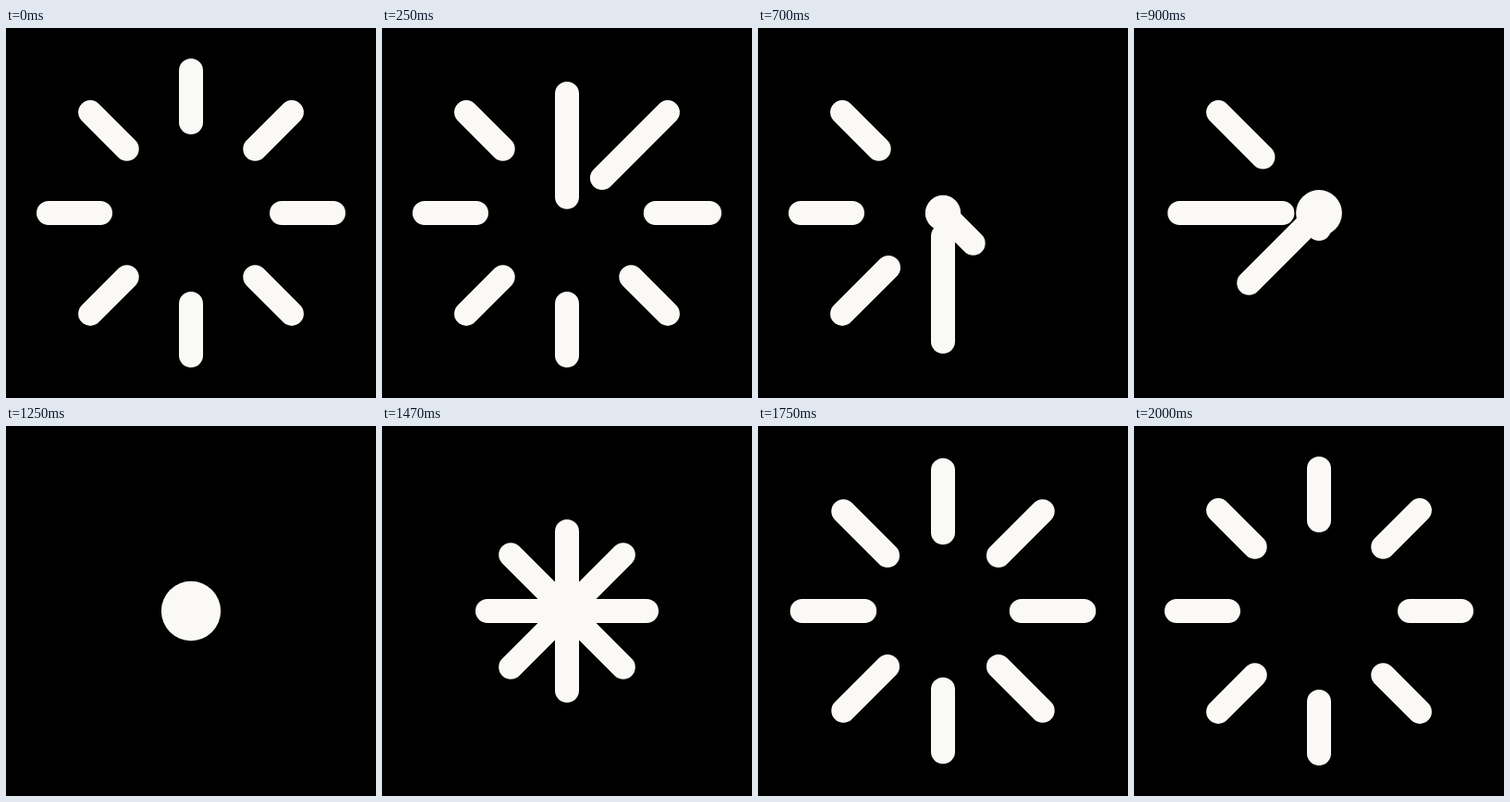
Animation of 400x400 px, one loop 2.02 s. Source, as an HTML page:

```html
<!DOCTYPE html>
<html lang="en">
<head>
<meta charset="utf-8">
<title>Spinner</title>
<style>
  html, body { margin: 0; width: 100%; height: 100%; overflow: hidden; background: #000; }
  svg { display: block; width: 100%; height: 100%; }
</style>
</head>
<body>
<svg viewBox="-200 -200 400 400">
  <g id="rays" stroke="#faf9f5" stroke-width="26" stroke-linecap="round"></g>
  <circle id="dot" fill="#faf9f5"/>
</svg>
<script>
const LOOP = 2020;
const INNER = 98, OUTER = 154;
const CAP = 13, DOT = 32.5;

// When the outer end of each ray starts inward, clockwise from the top.
const STARTS = [166, 254, 380, 489, 637, 779, 872, 986];
const LEAD = 159, PULL = 333;
const BURST = 1333, RELEASE = 1452;

const progress = (t, start, length) => Math.min(1, Math.max(0, (t - start) / length));
const smooth = p => p * p * (3 - 2 * p);
const burst = p => smooth(Math.sqrt(p));
const mix = (a, b, p) => a + (b - a) * p;

const dot = document.getElementById("dot");
const rays = STARTS.map((start, i) => {
  const line = document.createElementNS("http://www.w3.org/2000/svg", "line");
  line.setAttribute("transform", `rotate(${i * 45})`);
  document.getElementById("rays").append(line);
  return { line, start };
});

function drawRay({ line, start }, t) {
  let inner, outer;
  if (t < BURST) {
    inner = INNER * (1 - smooth(progress(t, start - LEAD, PULL)));
    outer = OUTER * (1 - smooth(progress(t, start, PULL)));
  } else {
    inner = INNER * burst(progress(t, RELEASE, 505));
    outer = OUTER * burst(progress(t, BURST, 475));
  }
  line.setAttribute("y1", -inner);
  line.setAttribute("y2", -outer);
}

function dotRadius(t) {
  if (t < 333 || t >= RELEASE) return 0;
  if (t < BURST) return mix(CAP, DOT, smooth(progress(t, 320, BURST - 320)));
  return mix(DOT, CAP, smooth(progress(t, BURST, RELEASE - BURST)));
}

function render(t) {
  rays.forEach(ray => drawRay(ray, t));
  dot.setAttribute("r", dotRadius(t));
}

const origin = performance.now();
function tick() {
  render((performance.now() - origin) % LOOP);
  requestAnimationFrame(tick);
}
tick();
</script>
</body>
</html>
```
